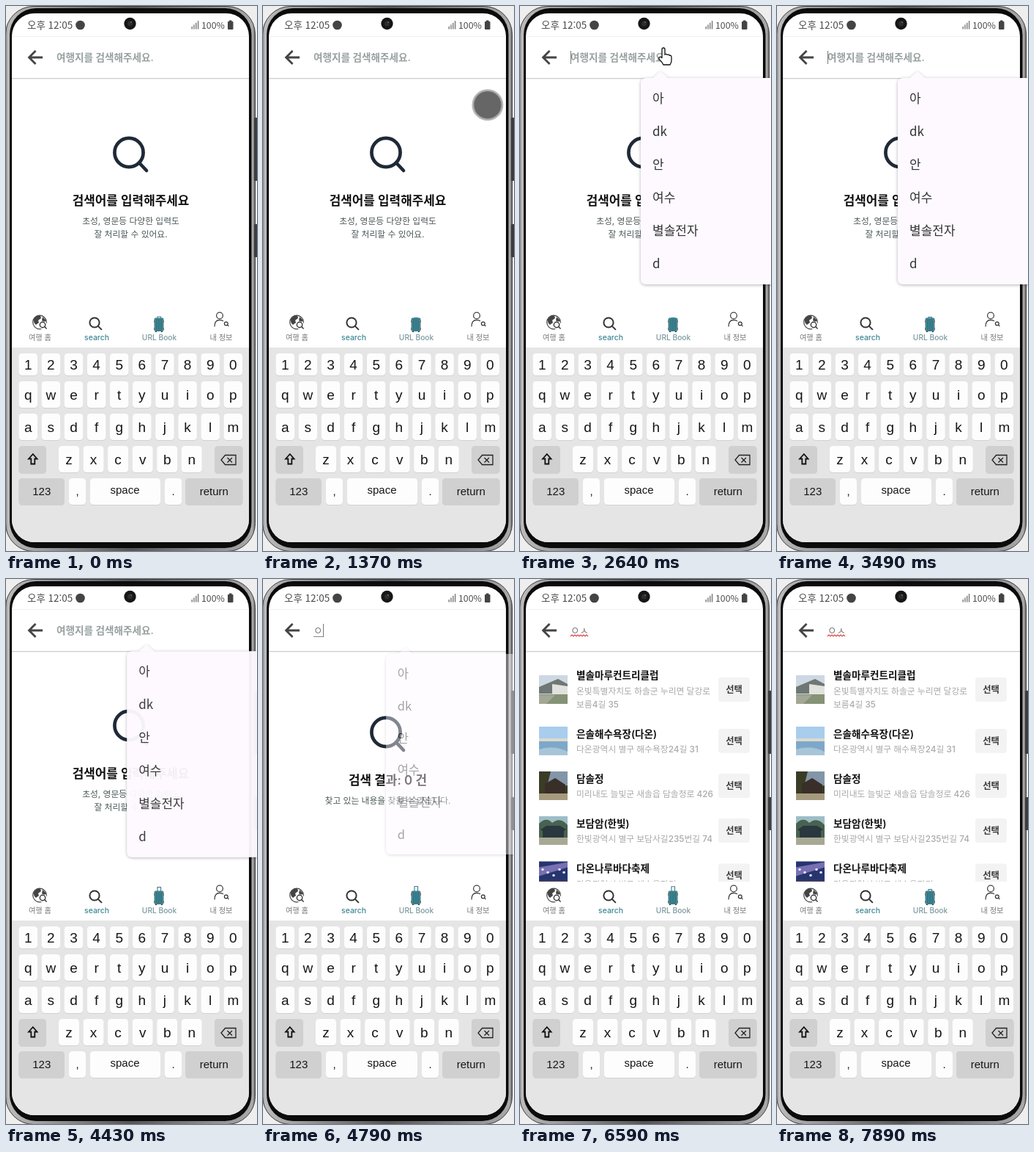
Write an HTML page that moves like this. It is 343x742 px and loops after 7990 ms.

```html
<!DOCTYPE html>
<html lang="ko">
<head>
<meta charset="utf-8">
<title>여행지 검색</title>
<style>
html, body { margin: 0; width: 100%; height: 100%; overflow: hidden; background: #eee; }
svg { display: block; width: 343px; height: 742px; }
text { font-family: Inter, 'Noto Sans CJK KR', 'Noto Sans CJK', sans-serif; white-space: pre; }
.plain { font-family: 'Noto Sans CJK KR', 'Noto Sans CJK', sans-serif; }
.key { font-family: 'Liberation Sans', Arial, sans-serif; }
</style>
</head>
<body>
<svg id="stage" viewBox="0 0 343 742"></svg>
<script>
const LOOP = 7990;

// ---------- drawing helpers ----------
const rect = (x, y, w, h, fill, r = 0, extra = '') =>
  `<rect x="${x}" y="${y}" width="${w}" height="${h}" rx="${r}" fill="${fill}" ${extra}/>`;
const circle = (x, y, r, fill, extra = '') =>
  `<circle cx="${x}" cy="${y}" r="${r}" fill="${fill}" ${extra}/>`;
const line = (d, color, width, extra = '') =>
  `<path d="${d}" fill="none" stroke="${color}" stroke-width="${width}" ${extra}/>`;
const shape = (d, fill) => `<path d="${d}" fill="${fill}"/>`;
const group = (id, content, extra = '') => `<g id="${id}" ${extra}>${content}</g>`;
// y is the vertical middle of the line
const text = (x, y, size, fill, str, { weight = 400, anchor = 'start', cls = '' } = {}) =>
  `<text x="${x}" y="${y + size * 0.36}" font-size="${size}" fill="${fill}" font-weight="${weight}"
    text-anchor="${anchor}" class="${cls}">${str}</text>`;
const middle = (x, y, size, fill, str, weight, cls) =>
  text(x, y, size, fill, str, { weight, cls, anchor: 'middle' });

// ---------- phone ----------
const phone = () =>
  rect(-0.5, 0.5, 341, 742, 'url(#metal)', 38, 'stroke="#3a3a3a"') +
  rect(5, 3, 330.5, 735, '#0b0b0b', 36) +
  rect(339, 152, 5, 86, '#3c3c40', 1) + rect(339, 297, 5, 45, '#3c3c40', 1);

const statusBar = () =>
  text(29, 26, 13.5, '#4a4a4a', '오후 12:05', { cls: 'plain', weight: 300 }) +
  circle(101.5, 26, 6.3, '#444') +
  circle(169.5, 24, 8.2, '#161616') + circle(169.5, 24, 3.5, '#2c2c30') + circle(171, 22, 1, '#666') +
  [0, 1, 2, 3].map(i => rect(253.5 + i * 2.8, 28 - i * 2.6, 1.4, 3.5 + i * 2.6, '#777')).join('') +
  text(267, 26.5, 12.3, '#4a4a4a', '100%', { cls: 'plain', weight: 300 }) +
  rect(303, 21, 7.5, 11, '#444', 1) + rect(305, 19.5, 3.5, 2, '#444');

const header = () =>
  rect(8, 41, 324, 1, '#f0f0f0') + rect(8, 98, 324, 1, '#cfcfcf') + rect(8, 99, 324, 1, '#eee') +
  line('M50 70H32M40.5 61L31.5 70L40.5 79', '#444', 2.8);

// ---------- page contents ----------
const lens = () => circle(168, 199.5, 19.6, 'none', 'stroke="#1f2937" stroke-width="4.7"') +
  line('M182 213.5L192 224', '#1f2937', 4.7, 'stroke-linecap="round"');
const message = (title, ...lines) => lens() + middle(170.5, 264.5, 16.9, '#111', title, 600) +
  lines.map((s, i) => middle(170.5, 293 + i * 18, 11.8, '#4b5858', s)).join('');

// Thumbnails are drawn in a 39 x 39 box.
const blank = rect(0, 0, 39, 39, '#e5e7ed') +
  line('M15 16L18 15L21 16L24 15V24L21 25L18 24L15 25ZM18 15V24M21 16V25', '#999', 0.8);
const band = (y, h, color) => rect(0, y, 39, h, color);
const thumbs = {
  brick: band(0, 39, '#d2dae2') + shape('M0 12Q8 4 14 14Q22 6 28 10Q34 2 39 6V39H0Z', '#6b5a50') +
    band(22, 8, '#5c3a34') + band(30, 9, '#545348') + line('M6 30L10 6M33 30L29 3', '#332c28', 1.5),
  pagoda: band(0, 39, '#efe5cb') + shape('M0 0H39V4Q20 9 0 5Z', '#71694c') +
    shape('M0 31Q10 28 18 30H39V39H0Z', '#2c2b20') + shape('M20 17L23 22H21L26 26H22V32H17V26H13L18 22H16Z', '#34301f'),
  forest: band(0, 39, '#46523f') + shape('M0 0H39V10Q26 16 16 8Q8 14 0 10Z', '#343f2d') +
    shape('M10 20Q20 12 28 22T39 28V39H6Z', '#66705b') + circle(15, 27, 4, '#303a2d'),
  club: band(0, 39, '#cdd8e2') + shape('M0 16L26 5L39 12V25H0Z', '#6f7774') +
    shape('M18 12L39 15V27H18Z', '#e1e2de') + band(26, 13, '#859276') + shape('M0 27H22L10 39H0Z', '#a3a795'),
  beach: band(0, 20, '#a9cdec') + band(16, 5, '#dcdad0') + band(20, 19, '#7ea8c9') +
    shape('M0 39V31Q20 25 39 34V39Z', '#a8c5d8'),
  pavilion: band(0, 39, '#8296a8') + shape('M0 0H16L10 24L39 19V39H0Z', '#3b3c26') +
    shape('M8 17L22 9L36 18V31H8Z', '#3a2e28') + band(30, 9, '#a59a7e'),
  temple: band(0, 39, '#9dbdc7') + shape('M0 10Q10 0 18 9Q29 0 39 12V39H0Z', '#48624f') +
    shape('M2 18L10 13H29L37 18L34 20V29H5V20Z', '#29383e') + band(29, 10, '#a8a994'),
  festival: band(0, 39, '#27356f') + shape('M0 8L39 1V8L0 20Z', '#7770b2') +
    [5, 12, 20, 28, 34].map((x, i) => circle(x, 11 + i % 3 * 4, 1.8, '#e7e1ed')).join('') + band(26, 13, '#45405c')
};

const place = ([y, picture, titles, addresses]) => {
  let lineY = y - 9.5 * (titles.length + addresses.length - 1);
  const write = (s, size, color, weight, step) => {
    const out = text(77, lineY, size, color, s, { weight });
    lineY += step;
    return out;
  };
  return `<g transform="translate(26 ${y - 19.5})">${picture}</g>` +
    titles.map(s => write(s, 13.6, '#111', 600, 21)).join('') +
    addresses.map(s => write(s, 11.8, '#a9a9a9', 500, 18)).join('') +
    rect(271, y - 16.5, 43, 33, '#f3f3f3', 4) + middle(292.5, y, 12.3, '#3c3c3c', '선택', 600);
};
const firstList = [
  [151.5, thumbs.brick, ['옛 달솔신학교와 은재로 나루성심', '성당'], ['가람특별시 누리구 은재로27길 63']],
  [223.5, thumbs.pagoda, ['다솔 은담리 오층석탑'], ['온빛특별자치도 다솔시 은담면 은담리']],
  [284.5, blank, ['해밀 다온류씨 담천재사'], ['미리내도 해밀군 보람면 담천사길 268']],
  [355.5, thumbs.forest, ['라온 숲길 놀이마당'], ['온빛특별자치도 라온군 숲솔면 숲솔휴', '양림로 187']],
  [424.5, blank, ['하늬 참솔마루 옛터'], ['미리내도 하늬시 참솔면 참솔길 52']]
];
const secondList = [
  [150.5, thumbs.club, ['별솔마루컨트리클럽'], ['온빛특별자치도 하솔군 누리면 달강로', '보름4길 35']],
  [220.5, thumbs.beach, ['은솔해수욕장(다온)'], ['다온광역시 별구 해수욕장24길 31']],
  [281.5, thumbs.pavilion, ['담솔정'], ['미리내도 늘빛군 새솔읍 담솔정로 426']],
  [342.5, thumbs.temple, ['보담암(한빛)'], ['한빛광역시 별구 보담사길235번길 74']],
  [404, thumbs.festival, ['다온나루바다축제'], ['다온광역시 별구 해수욕장길']]
];

// ---------- bottom navigation ----------
const smallLens = (x, y, r, width) => circle(x, y, r, '#fff', `stroke="#333" stroke-width="${width}"`) +
  line(`M${x + r * 0.7} ${y + r * 0.7}l${r * 0.8} ${r * 0.8}`, '#333', width);
const suitcase = () =>
  group('handle', line('M207 10V1H211.5V10', '#567f88', 1.2)) +
  rect(202.5, 424.5, 13, 18.5, '#3f8796', 2) +
  line('M206 426V442M209 426V442M212 426V442', '#2c6674', 1) +
  [428, 438].map(y => rect(202, y, 1.3, 3, '#a06a4c') + rect(214.7, y, 1.3, 3, '#a06a4c')).join('') +
  rect(204, 443, 2, 1, '#333') + rect(212, 443, 2, 1, '#333');
const navigation = () =>
  rect(8, 412, 324, 53, '#fff') +
  circle(46, 430.5, 9.3, '#fff', 'stroke="#444" stroke-width="1.2"') +
  shape('M38 426Q41 421 47 421.5L48 425L44 428L45 431L41 434Q37 431 38 426ZM50 423L55 428L52 431L49 428Z', '#444') +
  circle(50.5, 434.5, 5.5, '#fff') + smallLens(50, 434, 3.7, 1.4) +
  smallLens(121, 431, 6.6, 2) + suitcase() +
  circle(292, 421.5, 4.4, 'none', 'stroke="#444" stroke-width="1.3"') +
  line('M285 436.5Q285 427.5 292 427.5Q295 427.5 297 429', '#444', 1.3) +
  smallLens(300.8, 432.5, 2.4, 1.2) +
  middle(46.5, 451, 10.2, '#777', '여행 홈') + middle(124, 451, 10.4, '#3b8593', 'search', 500) +
  middle(209.5, 451, 10.2, '#7b989e', 'URL Book', 500) + middle(294, 451, 10.2, '#777', '내 정보');

// ---------- keyboard ----------
const key = (x, y, w, h, label = '', size = 19, fill = '#fdfdfd') =>
  rect(x, y + 1, w, h, '#d2d2d2', 4.5) + rect(x, y, w, h, fill, 4.5) +
  middle(x + w / 2, y + h / 2, size, '#161616', label, 400, 'key');
const keyRow = (letters, x, y, w, h, step) => [...letters].map((c, i) => key(x + i * step, y, w, h, c)).join('');
const keyboard = () => {
  const grey = '#d0d0d0';
  return rect(8, 465, 324, 270, '#e5e5e5') +
    keyRow('1234567890', 17.5, 473, 25.5, 30, 31.12) +
    keyRow('qwertyuiop', 17.5, 511, 25.5, 36, 31.12) +
    keyRow('asdfghjklm', 17.5, 555, 25.5, 36, 31.12) +
    keyRow('zxcvbn', 72, 599, 28, 36, 33.55) +
    key(17.5, 599, 37.5, 37, '', 15, grey) + key(285, 599, 38.5, 37, '', 15, grey) +
    line('M36.8 610L42.5 616.5H39.3V623.5H34.3V616.5H31Z', '#111', 1.8) +
    line('M299.5 611.5H314V624.5H299.5L294 618ZM302.5 615L309 621.5M309 615L302.5 621.5', '#222', 1.3) +
    key(17.5, 643, 62.5, 36, '123', 15, grey) + key(86, 643, 23, 36, ',', 15) +
    key(115, 643, 96, 36, '', 15) + middle(162.5, 659, 15, '#161616', 'space', 400, 'key') +
    key(217, 643, 23, 36, '.', 15) + key(245, 643, 78.5, 36, 'return', 15, grey);
};

// ---------- suggestion popup and pointers ----------
const popup = () =>
  `<path d="M173 98H182L192 89L202 98H379Q387 98 387 106V371Q387 379 379 379H173Q165 379 165 371V106Q165 98 173 98Z"
    fill="#fdf9ff" filter="url(#shadow)"/>` +
  ['아', 'dk', '안', '여수', '별솔전자', 'd']
    .map((s, i) => text(181, 126 + i * 45, 17, '#333', s, { cls: 'plain' })).join('');

const handShape = 'M-2 13V2Q-2 0 0 0T2 2V9Q4 7.5 5 9.5Q7.5 8.3 8.3 10.5Q11 9.5 11 13V17Q11 20 9 23H0' +
  'Q-2 19 -5.5 16Q-7 13.5 -5 12.5T-2 14Z';

const stage = document.getElementById('stage');
stage.innerHTML = `<defs>
  <linearGradient id="metal"><stop offset="0" stop-color="#777"/><stop offset=".008" stop-color="#bbb"/>
    <stop offset=".5" stop-color="#555"/><stop offset=".99" stop-color="#aaa"/><stop offset="1" stop-color="#666"/></linearGradient>
  <filter id="shadow" x="-10%" y="-10%" width="120%" height="120%">
    <feDropShadow dx="0" dy="1" stdDeviation="2" flood-color="#000" flood-opacity=".3"/></filter>
  <clipPath id="screen">${rect(8, 10, 324, 720, '#fff', 31)}</clipPath>
  <clipPath id="content">${rect(8, 100, 324, 312, '#fff')}</clipPath></defs>` +
  phone() +
  `<g clip-path="url(#screen)">` + rect(8, 10, 324, 721, '#fff') + statusBar() + header() +
  group('placeholder', text(69, 70, 13.6, '#98a0a0', '여행지를 검색해주세요.', { weight: 600 })) +
  group('typedOne', text(69, 70, 13.6, '#777', 'ㅇ', { weight: 500 })) +
  group('typedTwo', text(81.5, 70, 13.6, '#777', 'ㅅ', { weight: 500 })) +
  group('composing', rect(0, 78, 13, 1, '#888')) +
  group('squiggle', line('M69 78' + 'l2 -2l2 2'.repeat(6), '#e04040', 1.1)) +
  group('caret', rect(0, 61, 1, 18, '#777')) +
  `<g clip-path="url(#content)">` +
  group('prompt', message('검색어를 입력해주세요', '초성, 영문등 다양한 입력도', '잘 처리할 수 있어요.')) +
  group('nothing', message('검색 결과: 0 건', '찾고 있는 내용을 찾을 수 없습니다.'), 'transform="translate(0 9)"') +
  group('first', firstList.map(place).join('')) +
  group('second', secondList.map(place).join('')) + `</g>` +
  navigation() + keyboard() + `</g>` +
  group('popup', popup()) +
  group('touch', circle(0, 0, 20, 'rgba(0,0,0,.6)', 'stroke="rgba(175,175,175,.85)" stroke-width="3"')) +
  group('hand', `<path d="${handShape}" fill="#fff" stroke="#111" stroke-width="1.3"/>`);

// ---------- motion ----------
const el = id => document.getElementById(id);
const show = (id, on) => el(id).setAttribute('display', on ? 'inline' : 'none');
const move = (id, x, y) => el(id).setAttribute('transform', `translate(${x} ${y})`);
const within = (t, ...spans) => spans.some(([a, b]) => t >= a && t < b);

// Linear interpolation through [time, value] points
function track(t, points) {
  if (t <= points[0][0]) return points[0][1];
  for (let i = 1; i < points.length; i++) {
    const [t0, v0] = points[i - 1], [t1, v1] = points[i];
    if (t < t1) return v0 + (v1 - v0) * (t - t0) / (t1 - t0);
  }
  return points[points.length - 1][1];
}

function draw(t) {
  const one = t >= 4470, two = t >= 4950;
  show('placeholder', !one);
  show('typedOne', one);
  show('typedTwo', two);
  show('composing', within(t, [4470, 5760]));
  move('composing', two ? 81.5 : 69, 0);
  show('squiggle', t >= 6180);
  show('caret', within(t, [2310, 2810], [3310, 3500], [4470, 5760], [6230, 6590]));
  move('caret', two ? 94 : one ? 82 : 69, 0);

  show('prompt', t < 4560);
  show('nothing', within(t, [4560, 5540]));
  show('first', within(t, [5540, 5720]));
  show('second', t >= 5720);

  const lift = track(t, [[0, 2.5], [620, 1], [3300, 1], [4700, 7], [6500, 7], [LOOP, 2.5]]);
  move('handle', 0, 424.5 - lift);

  const opacity = track(t, [[2250, 0], [2600, 1], [4400, 1], [5100, 0]]);
  const scale = 0.95 + 0.05 * opacity;
  show('popup', opacity > 0);
  el('popup').setAttribute('opacity', opacity);
  el('popup').setAttribute('transform', `translate(276 238.5) scale(${scale}) translate(-276 -238.5)`);

  show('touch', within(t, [1110, 2330]));
  move('touch', track(t, [[1110, 355], [1900, 209.5], [1990, 209.5], [2200, 197]]),
    track(t, [[1110, 153], [1900, 97.5], [1990, 97.5], [2200, 62.5]]));
  show('hand', within(t, [2330, 3450]));
  move('hand', track(t, [[2810, 196], [3450, 313]]), 57);
}

function tick() {
  draw(performance.now() % LOOP);
  requestAnimationFrame(tick);
}
tick();
</script>
</body>
</html>
```
